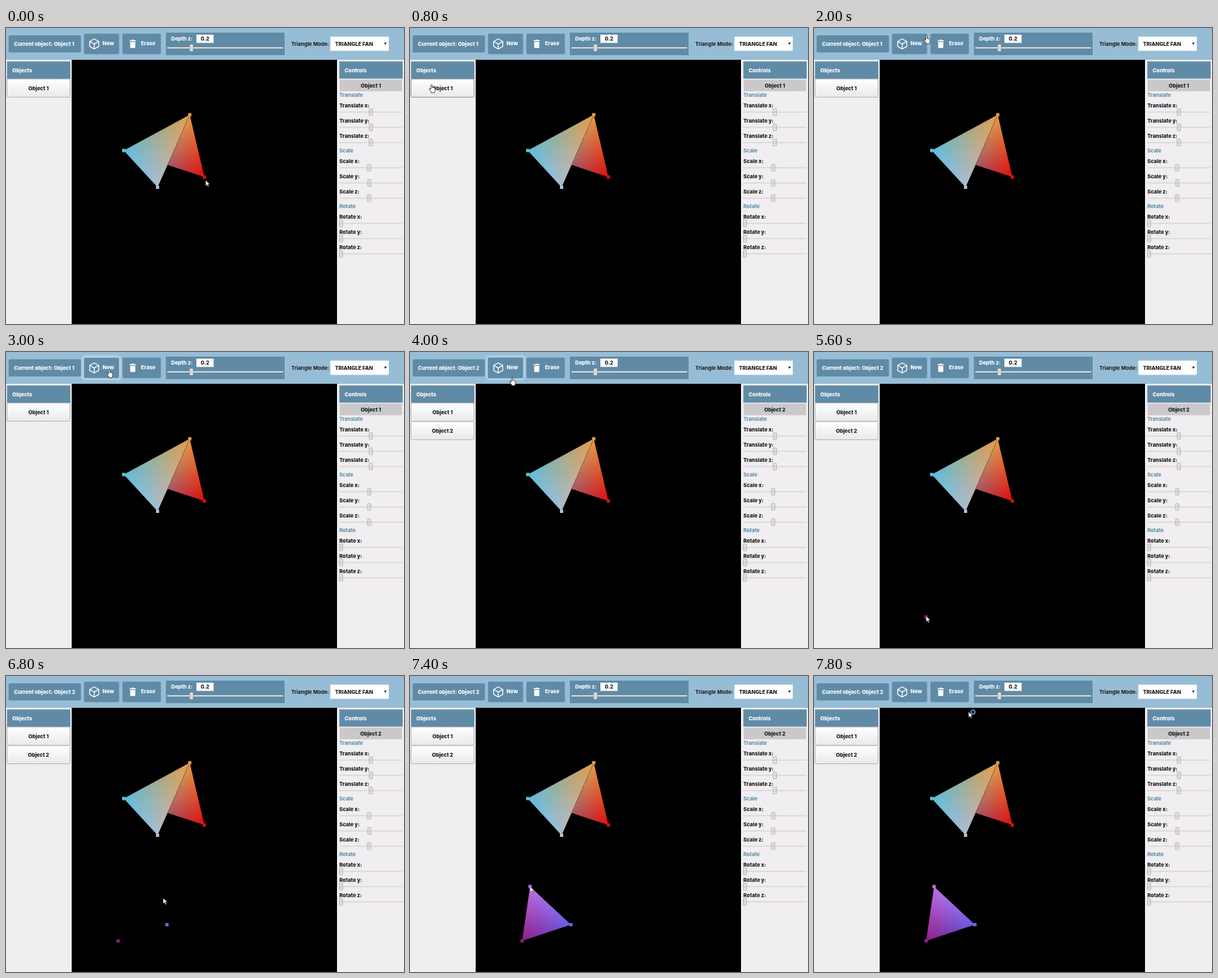
These frames come from a looping animation (600x447 px, 8 s). An HTML page:

```html
<!DOCTYPE html>
<html lang="en">
<head>
<meta charset="utf-8">
<title>Triangle editor</title>
<style>
  html, body { margin: 0; width: 100%; height: 100%; overflow: hidden; background: #f0eef0; }
  svg { display: block; width: 100%; height: 100%; }
  text { font: 800 7.8px Inter, Arial, sans-serif; fill: #1c1c1c; }
  .light { fill: #fff; }
  .section { fill: #558aa5; font-weight: 700; }
  .bar { fill: #608ba7; }
  .mid { text-anchor: middle; }
  .face { isolation: isolate; }
  .face polygon { mix-blend-mode: plus-lighter; }
</style>
</head>
<body>
<svg viewBox="0 0 600 447" preserveAspectRatio="none">
  <defs>
    <linearGradient id="item" x2="0" y2="1">
      <stop stop-color="#fff"/><stop offset="1" stop-color="#eae9ea"/>
    </linearGradient>
    <filter id="blur" x="-20%" y="-30%" width="140%" height="160%"><feGaussianBlur stdDeviation="2"/></filter>
  </defs>

  <rect width="600" height="447" fill="#f0eef0"/>
  <rect width="600" height="48" fill="#97bdd6"/>
  <rect x="99" y="48" width="400" height="399"/>

  <rect class="bar" x="4" y="11" width="109" height="26" rx="2"/>
  <text class="light" x="12" y="27">Current object: <tspan class="current"></tspan></text>

  <rect id="glow" x="116" y="7" width="56" height="34" rx="3" fill="#d9e8f2" filter="url(#blur)"/>
  <rect id="newButton" class="bar" x="117.5" y="8.5" width="53" height="31" rx="2"/>
  <path d="M133 16.5l6.8 3.8v7.6l-6.8 3.8l-6.8-3.8v-7.6zM126.2 20.3l6.8 3.8l6.8-3.8M133 24.1v7.6"
        fill="none" stroke="#fff" stroke-width="1.3" stroke-linejoin="round"/>
  <text class="light" x="145.5" y="26">New</text>

  <rect class="bar" x="175.5" y="8.5" width="58" height="31" rx="2"/>
  <path class="light" d="M186.5 18.5h2.6l.8-.9h2.4l.8.9h2.6v1.4h-9.2zM187.2 21h7.8v7.8q0 1.4-1.4 1.4h-5q-1.4 0-1.4-1.4z"/>
  <text class="light" x="203.5" y="26">Erase</text>

  <rect class="bar" x="241" y="7" width="179" height="34"/>
  <text class="light" x="249" y="19">Depth z:</text>
  <rect class="light" x="287" y="10" width="26" height="12.5"/>
  <text class="mid" x="300" y="19">0.2</text>

  <text x="430" y="27" style="font-weight:700">Triangle Mode:</text>
  <rect class="light" x="489" y="13" width="88" height="21.5"/>
  <text x="496" y="27">TRIANGLE FAN</text>
  <path d="M570 22.2h4l-2 3z"/>

  <rect class="bar" x="1.5" y="50.5" width="95.5" height="26.5"/>
  <text class="light" x="9.5" y="66.5">Objects</text>
  <g id="items"></g>

  <rect class="bar" x="502.5" y="50.5" width="95.5" height="26"/>
  <text class="light" x="510.5" y="66.5">Controls</text>
  <rect x="503" y="78" width="94" height="17.5" fill="#cac8c9"/>
  <text class="mid current" x="550" y="89.5"></text>
  <g id="controls"></g>

  <g id="scene"></g>

  <path id="arrow" d="M0 0v8.4l2-1.8l1.4 3.2l1.4-.6l-1.4-3.1h2.8z" fill="#fff" stroke="#222" stroke-width=".5"/>
  <path id="hand" d="M-1 1q0-1 1-1t1 1v3.6q.8-.5 1.5.1q.9-.4 1.4.4q1.5-.3 1.5 1.2v2.2q0 1.6-1 2.6v1.2h-5v-1.2l-3-4.2q-.4-1.2.8-1.2l1.8 1.6z"
        fill="#fff" stroke="#222" stroke-width=".8" stroke-linejoin="round"/>
  <circle id="busy" cx="239.8" cy="54.6" r="3" fill="#101830" stroke="#6d93e0" stroke-width="1.5"/>
</svg>
<script>
const $ = id => document.getElementById(id);
const SVG = 'http://www.w3.org/2000/svg';

function add(parent, tag, attrs, text = '') {
  const node = document.createElementNS(SVG, tag);
  for (const name in attrs) node.setAttribute(name, attrs[name]);
  node.textContent = text;
  return parent.appendChild(node);
}

function slider(parent, x, y, width, thumb) {
  add(parent, 'rect', { x, y: y - 1, width, height: 2, rx: 1, fill: '#dfdbd5' });
  add(parent, 'rect', { x: thumb - 2.5, y: y - 5, width: 5, height: 10, rx: .8, fill: '#e9e7e4', stroke: '#a5a29e', 'stroke-width': .8 });
  add(parent, 'path', { d: `M${thumb - 1} ${y - 1.5}h2m-2 1.5h2m-2 1.5h2`, stroke: '#aaa7a3', 'stroke-width': .6 });
}

slider($('controls'), 243, 30, 175, 279.5);
[['Translate', 104, 550], ['Scale', 188, 547.5], ['Rotate', 272, 505]].forEach(([title, top, thumb]) => {
  add($('controls'), 'text', { x: 502.5, y: top, class: 'section' }, title);
  ['x', 'y', 'z'].forEach((axis, i) => {
    add($('controls'), 'text', { x: 502.5, y: top + 15.5 + 23 * i }, `${title} ${axis}:`);
    slider($('controls'), 502, top + 23 + 23 * i, 96, thumb);
  });
});

function listItem(name, y) {
  const group = add($('items'), 'g', {});
  const box = add(group, 'rect', { x: 1.5, y, width: 95, height: 27.5, rx: 1, fill: 'url(#item)', stroke: '#b5b3b5', 'stroke-width': 1 });
  add(group, 'text', { x: 49, y: y + 16.5, class: 'mid' }, name);
  return { group, box };
}
const first = listItem('Object 1', 77);
const second = listItem('Object 2', 105);

// Blends three vertex colours by adding one gradient per corner.
let gradients = 0;
function face(...corners) {
  const group = add($('scene'), 'g', { class: 'face' });
  const points = corners.map(c => `${c.x},${c.y}`).join(' ');
  corners.forEach((c, i) => {
    const a = corners[(i + 1) % 3], b = corners[(i + 2) % 3];
    const dx = b.x - a.x, dy = b.y - a.y;
    const k = ((c.x - a.x) * dx + (c.y - a.y) * dy) / (dx * dx + dy * dy);
    const id = 'corner' + gradients++;
    const fill = add(group, 'linearGradient', {
      id, gradientUnits: 'userSpaceOnUse', x1: a.x + k * dx, y1: a.y + k * dy, x2: c.x, y2: c.y
    });
    add(fill, 'stop', { 'stop-color': '#000' });
    add(fill, 'stop', { offset: 1, 'stop-color': c.color });
    add(group, 'polygon', { points, fill: `url(#${id})` });
  });
  return group;
}

const vertex = (x, y, color) => ({ x, y, color });
const dot = v => add($('scene'), 'rect', { x: v.x - 2.5, y: v.y - 2.5, width: 5, height: 5, fill: v.color });

const orange = vertex(277, 131, '#e39c48'), red = vertex(299, 225, '#e00c0c');
const cyan = vertex(177.5, 185, '#5dbddd'), grey = vertex(228.5, 240.5, '#a9bdd4');
face(orange, red, cyan);
face(orange, cyan, grey);
[orange, red, cyan, grey].forEach(dot);

const plum = vertex(169, 400, '#8f1d86'), indigo = vertex(242.5, 375.5, '#695fe9'), violet = vertex(181, 318, '#bb72e2');
const newFace = face(plum, indigo, violet);
const newDots = [plum, indigo, violet].map(dot);

// Pointer tip: time, x, y
const path = [
  [0, 301, 230], [200, 286, 222], [400, 190, 165], [600, 75, 102], [800, 32.5, 85.5], [1200, 36, 88],
  [1400, 52, 82], [1800, 140, 25], [2000, 169.5, 11.5], [2400, 160, 20], [3000, 155.5, 26.5], [3800, 155.5, 27],
  [4200, 152, 50], [4600, 147.5, 94.5], [4800, 148, 108], [5000, 150, 165], [5400, 167, 385], [5600, 169, 399],
  [5800, 171, 399], [6000, 197, 390], [6400, 242, 375], [6600, 243, 370], [6800, 237, 335.5],
  [7200, 181, 318], [7400, 181, 318], [7600, 207, 190], [7800, 233, 54]
];

function pointerAt(t) {
  const i = path.findIndex(p => p[0] > t);
  if (i < 0) return path[path.length - 1].slice(1);
  const [t0, x0, y0] = path[i - 1], [t1, x1, y1] = path[i];
  const k = (t - t0) / (t1 - t0);
  return [x0 + (x1 - x0) * k, y0 + (y1 - y0) * k];
}

const show = (node, on) => node.setAttribute('visibility', on ? 'visible' : 'hidden');

function draw(t) {
  const [x, y] = pointerAt(t);
  const created = t >= 3800;
  const overItem = x < 97 && y > 77 && y < 105;
  const overNew = x > 117 && x < 171 && y > 8 && y < 40;

  document.querySelectorAll('.current').forEach(n => n.textContent = created ? 'Object 2' : 'Object 1');
  show(second.group, created);
  first.box.setAttribute('stroke', overItem ? '#8f8d8f' : '#b5b3b5');
  show($('glow'), overNew && t >= 2400);
  $('newButton').setAttribute('stroke', created && t < 5600 ? '#6aa3d0' : 'none');

  show(newDots[0], t >= 5600);
  show(newDots[1], t >= 6400);
  show(newDots[2], t >= 7400);
  show(newFace, t >= 7400);

  const hand = overItem || overNew;
  show($('hand'), hand);
  show($('arrow'), !hand);
  $(hand ? 'hand' : 'arrow').setAttribute('transform', `translate(${x} ${y})`);
  show($('busy'), t >= 7800);
}

const STEP = 200, LOOP = 8000;
const start = performance.now();
function tick() {
  const elapsed = (performance.now() - start) % LOOP;
  draw(Math.floor(elapsed / STEP) * STEP);
  requestAnimationFrame(tick);
}
tick();
</script>
</body>
</html>
```
